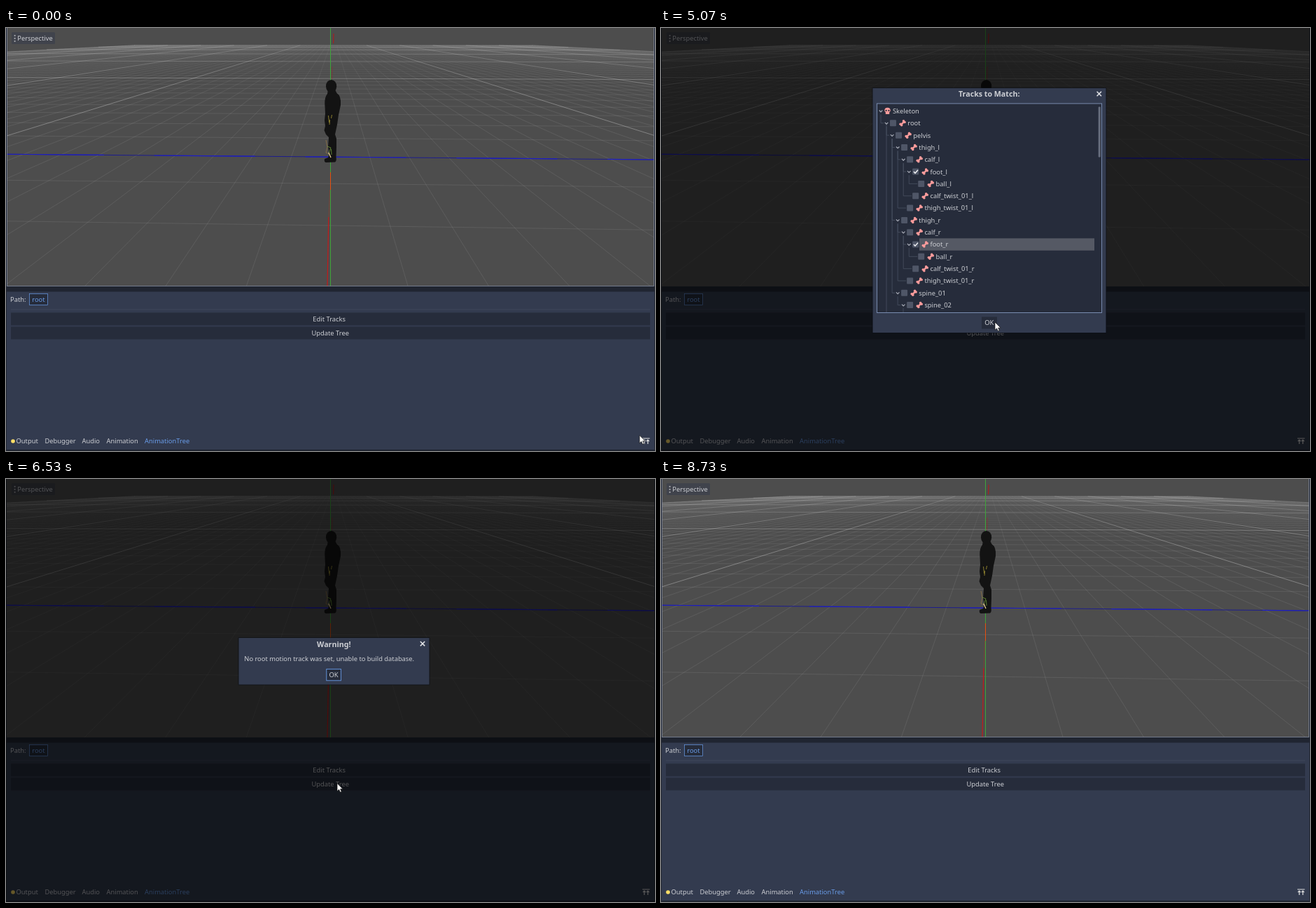
Write an HTML page that moves like this. It is 927 px wide and 604 px high and loops after 9.19 s.

```html
<!DOCTYPE html>
<html>
<head>
<meta charset="utf-8">
<style>
html, body { margin: 0; height: 100%; overflow: hidden; background: #202531; }
svg { display: block; width: 927px; height: 604px; font: 9.33px "Noto Sans", sans-serif; fill: #cdcfd4; cursor: default; }
.title { font-size: 10.67px; font-weight: bold; }
.mid { text-anchor: middle; }
.accent { fill: #699ce8; }
.line { fill: none; }
</style>
</head>
<body>
<svg id="stage" viewBox="0 0 927 604"></svg>
<script>
const BASE = '#333b4f', DARK = '#262c3b', ACCENT = '#699ce8', PINK = '#fc9c9c';
const LOOP = 9190, FRAME = 200 / 3;

const rect = (x, y, w, h, fill, extra = '') =>
  `<rect x="${x}" y="${y}" width="${w}" height="${h}" fill="${fill}" ${extra}/>`;
const text = (x, y, s, cls = '') => `<text x="${x}" y="${y}" class="${cls}">${s}</text>`;
const line = (d, color, width = 1, extra = '') =>
  `<path class="line" d="${d}" stroke="${color}" stroke-width="${width}" ${extra}/>`;
const group = (id, body) => `<g id="${id}">${body}</g>`;
const outline = (x, y, w, h, color, width = 1, id = '') =>
  rect(x, y, w, h, 'none', `stroke="${color}" stroke-width="${width}" id="${id}"`);

// Ground plane: rows recede to y = HORIZON, columns meet at VANISH_X.
const HORIZON = 10, VANISH_X = 468, CENTER = 463.5, CELL = 56, SIZE = 60;

// White that thins out towards the horizon.
const haze = (id, far, near) =>
  `<linearGradient id="${id}" gradientUnits="userSpaceOnUse" x1="0" y1="24" x2="0" y2="110">
    <stop stop-color="#fff" stop-opacity="${far}"/><stop offset="1" stop-color="#fff" stop-opacity="${near}"/>
  </linearGradient>`;

function grid() {
  const paths = { minor: '', major: '' };
  const add = (n, d) => paths[n % 10 ? 'minor' : 'major'] += d;
  const column = (n, y) =>
    (VANISH_X + (CENTER + CELL * n - VANISH_X) * (y - HORIZON) / 174).toFixed(1);
  for (let n = -SIZE; n <= SIZE; n++) {
    if (n) add(n, `M${column(n, 24.7)} 24.7L${column(n, 400)} 400`);
    if (!n || n < -2) continue;
    const y = HORIZON + 965.7 / (5.55 + n);
    const x1 = Math.max(0, column(-SIZE, y)), x2 = Math.min(927, column(SIZE, y));
    const at = x => (y + (x - CENTER) * 5e-5 * (y - HORIZON)).toFixed(2);
    add(n, `M${x1} ${at(x1)}L${x2} ${at(x2)}`);
  }
  return haze('minor', .035, .085) + haze('major', .18, .3) +
    line(paths.minor, 'url(#minor)') + line(paths.major, 'url(#major)');
}

function axes() {
  return line('M0 180.2L927 188', '#1c1c8e') +
    line('M-4 180.2L927 188', '#1d1dc6', 1.2, 'stroke-dasharray="144 71.8"') +
    line('M463.5 0V369', '#3ea63a') +
    line('M468 8L467.6 22', '#b01c1c', 1.1) + line('M466 55L465.6 73', '#b01c1c', 1, 'opacity=".45"') +
    line('M462.6 231L461 270', '#a83a22', 1, 'opacity=".5"') +
    line('M460.8 270L459 369', '#c41a1a', 1.2) +
    line('M463.5 206V231', '#e8500f');
}

function figure() {
  return `<g fill="#131313"><ellipse cx="464.6" cy="83.2" rx="7.6" ry="9.3"/>
    <path d="M460 88L459 94Q455 99 455.3 108L456 122 455 132 456 140 454.5 146 457 152 461 156 460 170
      462 180 460 185 455 187Q454 191.5 457 192L470 191.5Q472.5 190 471.5 184L472 170 472 158 470 152
      473 138 475 124 478 110Q479 97 472.5 93L470 88z"/></g>` +
    line('M460.5 125L461.6 135M465.5 124L464.5 129M462.5 131L462 138', '#a99a35', .8) +
    line('M457 160L459 170 457 178 462 180', '#8b7248', .9) +
    line('M459 169L464 171 461 179M464.5 173L465 181', '#6f9e3a', .8) +
    line('M461 178L464 185', '#f0d9a0', 1.2);
}

function editor() {
  const tabs = [['Output', 14.5], ['Debugger', 55.5], ['Audio', 108.5], ['Animation', 143.5]];
  return `<clipPath id="view"><rect x="1" width="925" height="369"/></clipPath>
    <g clip-path="url(#view)">` + rect(0, 0, 927, 369, '#4d4d4d') + grid() + axes() + figure() + '</g>' +
    outline(1.5, -1, 924, 369.5, '#7d869b', .8, 'viewFocus') +
    rect(8, 6, 62, 17, '#40434c', 'rx="1.5"') +
    [10.8, 14.8, 18.8].map(y => rect(11.7, y - .9, 1.8, 1.8, '#b4b6ba')).join('') +
    text(16.3, 18, 'Perspective') +
    rect(1, 376.5, 925, 225.5, BASE) +
    text(6, 391, 'Path:') + rect(33.5, 379.5, 26, 16, DARK, `stroke="${ACCENT}" stroke-width=".7"`) +
    text(37.3, 391, 'root', 'accent') +
    line('M7 402H920', '#3f475a') +
    rect(7, 406.5, 913, 18, DARK) + rect(7, 426.5, 913, 18, DARK) +
    outline(7.5, 407, 912, 17, '#6288cb', .9, 'editFocus') +
    outline(7.5, 427, 912, 17, '#5d6a88', .9, 'updateHover') +
    text(461.7, 419, 'Edit Tracks', 'mid') + text(463.2, 439, 'Update Tree', 'mid') +
    '<circle cx="10" cy="590" r="2.8" fill="#ffde66"/>' +
    tabs.map(([s, x]) => text(x, 593.3, s)).join('') + text(198, 593.3, 'AnimationTree', 'accent') +
    line('M909 586H919.5M911.7 594V588M909.7 590.2L911.7 588.2 913.7 590.2M916.8 594V588M914.8 590.2L916.8 588.2 918.8 590.2',
      '#e0e0e0', 1.2);
}

const frame = (x, y, w, h) =>
  rect(x - 1, y - 1, w + 2, h + 2, '#0d1017', 'opacity=".6" rx="1"') + rect(x, y, w, h, BASE);
const closeMark = (x, y) => line(`M${x - 3.2} ${y - 3.2}l6.4 6.4m0 -6.4l-6.4 6.4`, '#e4e5e8', 1.5);

// Depth and name of every visible tree row.
const rows = `0 Skeleton,1 root,2 pelvis,3 thigh_l,4 calf_l,5 foot_l,6 ball_l,5 calf_twist_01_l,
4 thigh_twist_01_l,3 thigh_r,4 calf_r,5 foot_r,6 ball_r,5 calf_twist_01_r,4 thigh_twist_01_r,
3 spine_01,4 spine_02`.split(',').map(s => s.trim().split(' ')).map(([d, name]) => ({ depth: +d, name }));
const rowY = i => 118.5 + 17.32 * i;

function bone(x, y) {
  const knobs = [[-3, 1.4], [-1.4, 3], [3, -1.4], [1.4, -3]];
  return line(`M${x - 2} ${y + 2}l4 -4`, PINK, 2.5) +
    knobs.map(([a, b]) => `<circle cx="${x + a}" cy="${y + b}" r="1.75" fill="${PINK}"/>`).join('');
}

const skull = (x, y) => `<path fill="${PINK}" d="M${x - 4.2} ${y - 1}a4.2 3.8 0 0 1 8.4 0q0 2 -1.5 2.8v2.7h-5.4v-2.7q-1.5 -.8 -1.5 -2.8z"/>
  <g fill="${DARK}"><circle cx="${x - 1.9}" cy="${y - .6}" r="1.1"/><circle cx="${x + 1.9}" cy="${y - .6}" r="1.1"/></g>`;

function tree() {
  let guides = 'M322 136V406M346 400V406', out = '';
  rows.forEach(({ depth, name }, i) => {
    const y = rowY(i), x = 314 + 8.05 * depth;
    const open = !rows[i + 1] || rows[i + 1].depth > depth;
    if (open) out += line(`M${x - 2.3} ${y - 1}l2.3 2.3 2.3 -2.3`, '#a9adb8', 1.2);
    if (!depth) {
      out += skull(323.5, y) + text(331, y + 3.4, name);
      return;
    }
    let parent = i;
    while (rows[parent].depth >= depth) parent--;
    guides += `M${x - 8.05} ${rowY(parent) + 5}V${y}H${open ? x - 4 : x + 4}`;
    out += rect(x + 4.9, y - 4.5, 9, 9, '#4f5667', 'rx="1"') + bone(x + 23, y) + text(x + 30.2, y + 3.4, name);
  });
  return line(guides, '#4a5162', .8) + out;
}

const selected = (id, i) => rect(369, rowY(i) - 8.7, 250, 17.4, '#555964', `id="${id}"`);
const tick = (id, i) => line(`M361 ${rowY(i)}l2 2.2 4 -4.6`, '#f0f1f3', 1.5, `id="${id}"`);

const tracksDialog = () => frame(302.5, 86, 333, 349) +
  text(468.7, 98.3, 'Tracks to Match:', 'title mid') + closeMark(625.8, 94) +
  rect(308, 107.5, 322, 299, DARK) + outline(308.4, 107.9, 321.2, 298.6, '#8296bd', .9, 'treeFocus') +
  selected('pickLeft', 5) + selected('pickRight', 11) + tree() +
  tick('tickLeft', 5) + tick('tickRight', 11) +
  rect(624.7, 112.5, 3, 72, '#656c7c', 'rx="1"') +
  rect(458, 412.5, 22, 17, DARK) + outline(458.4, 412.9, 21.2, 16.2, ACCENT, .9, 'okFocus') +
  text(468.8, 424.4, 'OK', 'mid');

const warningDialog = () => frame(332.5, 227, 272, 66.5) +
  text(468.3, 239.8, 'Warning!', 'title mid') + closeMark(595, 235.2) +
  text(340.3, 260.4, 'No root motion track was set, unable to build database.') +
  rect(457.8, 271.4, 20.6, 16.4, DARK, `stroke="${ACCENT}" stroke-width=".9"`) + text(468, 283, 'OK', 'mid');

document.getElementById('stage').innerHTML = editor() +
  rect(0, 0, 927, 604, '#000', 'id="dim"') +
  group('tracks', tracksDialog()) + group('warning', warningDialog()) +
  `<path id="pointer" fill="#fff" stroke="#111" stroke-width=".7"
    d="M0 0V11.2L2.6 8.9 4.4 12.8 6.3 12 4.6 8.2H8.1z"/>`;

// Pointer stops: time, x, y.
const stops = [
  [0, 905, 581.6], [530, 477.5, 409.5], [1000, 477.5, 409.5], [1730, 390, 237], [2070, 356, 186],
  [2470, 365, 206], [2870, 365, 206], [3730, 373, 290], [4530, 363, 309.5], [4670, 363, 309.5],
  [5070, 477, 420], [5470, 478, 422], [5600, 478, 422], [5800, 475.5, 433], [6000, 473, 434.5],
  [6600, 473, 434.5], [7270, 488, 286], [7450, 463, 278], [7600, 472, 282], [8000, 472, 282],
  [8670, 178, 590], [8730, 110, 603]
];

const clamp = v => Math.max(0, Math.min(1, v));

function pointerAt(t) {
  const next = stops.findIndex(s => s[0] > t);
  if (next < 0) return stops[stops.length - 1].slice(1);
  const [t0, x0, y0] = stops[next - 1], [t1, x1, y1] = stops[next];
  const p = (t - t0) / (t1 - t0), e = p * p * (3 - 2 * p);
  return [x0 + (x1 - x0) * e, y0 + (y1 - y0) * e];
}

// Shade behind a dialog that is open from a to b.
function shade(t, a, b) {
  if (t < a) return 0;
  return .6 * (t < b ? clamp((t - a + 60) / 195) : clamp(1 - (t - b - 20) / 184));
}

const show = (id, on) => document.getElementById(id).style.display = on ? '' : 'none';

function draw(now) {
  // The screen is sampled at 15 frames a second.
  const t = Math.floor((now % LOOP + 4) / FRAME) * FRAME + 4;
  const [x, y] = pointerAt(t);
  const between = (a, b) => t >= a && t < b;
  document.getElementById('pointer').setAttribute('transform', `translate(${x} ${y})`);
  document.getElementById('dim').setAttribute('opacity', Math.max(shade(t, 870, 5600), shade(t, 6400, 7800)));
  show('tracks', between(870, 5600));
  show('warning', between(6400, 7800));
  show('viewFocus', t < 870 || t >= 7800);
  show('editFocus', between(5600, 6400));
  show('updateHover', between(5600, 6400) && y > 427);
  show('treeFocus', t >= 2870);
  show('okFocus', t < 2870);
  show('pickLeft', between(2870, 4670));
  show('pickRight', t >= 4670);
  show('tickLeft', t >= 2870);
  show('tickRight', t >= 4670);
}

const start = performance.now();
function loop() {
  draw(performance.now() - start);
  requestAnimationFrame(loop);
}
loop();
</script>
</body>
</html>
```
